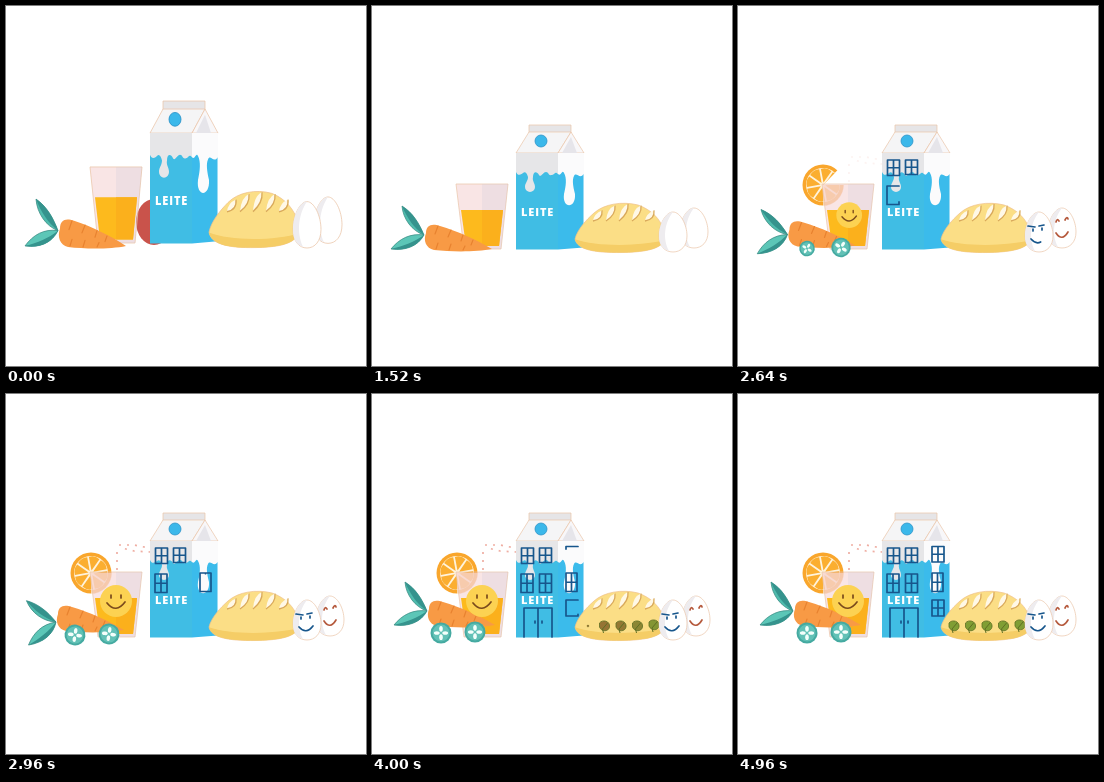
Recreate the animation shown at these times as an HTML page. Size 360 by 360 pixels, loop 5.04 s.

```html
<!DOCTYPE html>
<html lang="pt">
<head>
<meta charset="utf-8">
<style>
html, body { margin: 0; height: 100%; overflow: hidden; background: #fff; }
svg { display: block; width: 100vw; height: 100vh; }
.ink { fill: none; stroke: #17568c; stroke-width: 1.7; stroke-linecap: round; stroke-linejoin: round; }
.warm { stroke: #b5593c; }
.brown { stroke: #7a4a1c; }
.edge { stroke: #eac5a8; stroke-width: .7; }
text { font: 800 11px "Open Sans", sans-serif; letter-spacing: .9px; fill: #fff; }
</style>
</head>
<body>
<svg viewBox="0 0 360 360">
  <defs>
    <clipPath id="sweep"><path id="pie"/></clipPath>
    <clipPath id="loaf"><use href="#crust"/></clipPath>
  </defs>

  <ellipse id="fruit" cy="216" rx="18" ry="23" fill="#c9534b"/>

  <g id="straw" fill="none" stroke="#efaea3" stroke-width="1.7" stroke-dasharray="2 6">
    <path d="M111 176V156M113 151L128 151L143 154"/>
    <path d="M116 154L128 157L144 158" stroke-dashoffset="-3"/>
  </g>
  <g id="slice" clip-path="url(#sweep)">
    <circle cx="85" cy="179" r="20.5" fill="#f9a62c"/>
    <circle cx="85" cy="179" r="17" fill="#fff3dc"/>
    <g id="segments" fill="#fbae30"></g>
    <path d="M85 179h21a21 21 0 0 1 -21 21z" fill="#fdeee8" fill-opacity=".7"/>
  </g>

  <g id="glass">
    <path d="M84 178H136L129 243H92Z" fill="#e8a0a0" fill-opacity=".28" class="edge"/>
    <path d="M110 178H136L129 243H110Z" fill="#c4c2d4" fill-opacity=".2"/>
    <path d="M89 204H131L127 240H94Z" fill="#fdba1d"/>
    <path d="M110 204H131L127 240H110Z" fill="#fbb01c"/>
  </g>

  <g id="milk">
    <path d="M157 119H199V127H157Z" fill="#e6e5e7" class="edge"/>
    <path d="M157 126H199L186 147H144Z" fill="#f5f5f6" class="edge"/>
    <path d="M199 126L212 147H186Z" fill="#f8f7f9" class="edge"/>
    <path d="M199 131L205 147H190Z" fill="#e6e5ea"/>
    <path d="M144 147H186V243H144Z" fill="#e6e6e8"/>
    <path d="M186 147H212V241L186 243Z" fill="#fbfbfc"/>
    <path fill="#40bde4" d="M144 166C146 171 150 168 151 167C153 165 155 167 156 171C156 175 153 177 153 181A5 5 0 0 0 163 181C163 177 160 175 161 171C161 165 165 165 167 169C169 172 171 166 174 166C177 166 176 170 180 169C183 168 183 165 186 168V243.5H144Z"/>
    <path fill="#3bbbeb" d="M186 168C189 171 190 163 192 167C195 172 194 180 192 188C190 203 204 203 203 188C201 180 200 174 202 170C204 165 208 174 211.5 168V241.5L186 243.5Z"/>
    <circle cx="169" cy="135" r="6" fill="#3bb8ea" stroke="#2c93c8" stroke-width=".8"/>
    <text x="149" y="210">LEITE</text>
    <g id="windows"></g>
  </g>

  <g id="bread">
    <path id="crust" fill="#fbde86" stroke="#efc08a" stroke-width=".7" d="M203 233C205 224 214 214 222 207C232 198 250 195 266 199C280 204 288 213 292 224C297 239 285 246 250 246.5C220 247 205 243 203 233Z"/>
    <path clip-path="url(#loaf)" fill="#f5cd66" d="M200 232C220 241 270 241 297 233V250H200Z"/>
    <g id="cuts"></g>
    <g id="leaves"></g>
  </g>

  <g id="eggs">
    <g id="rear">
      <path class="edge" fill="#fff" d="M322 202C329 202 336 214 336 226C336 236 330 242 322 242C314 242 308 236 308 226C308 214 315 202 322 202Z"/>
      <path fill="#eeecef" d="M322 202C314 212 311 228 318 241C311 239 308 234 308 226C308 214 315 202 322 202Z"/>
      <path class="ink warm" data-at="2160" data-for="560" d="M316 216q1 -4 3 -1M325 214q2 -4 3 -1M316 227q6 9 12 -1"/>
    </g>
    <path class="edge" fill="#fff" d="M301 206C308 206 315 218 315 230C315 240 309 246 301 246C293 246 287 240 287 230C287 218 294 206 301 206Z"/>
    <path fill="#eeecef" d="M301 206C293 216 290 232 297 245C290 243 287 238 287 230C287 218 294 206 301 206Z"/>
    <path class="ink" data-at="2480" data-for="480" d="M290 220l7 1M301 220l5 -1M295 223v2M304 222v2M293 233q7 8 14 -1"/>
  </g>

  <g id="carrot">
    <g id="greens">
      <path fill="#4fbbad" stroke="#35877f" stroke-width=".7" d="M52 229C40 225 31 213 30 200C41 207 47 217 52 229Z"/>
      <path fill="#35938d" d="M52 229C42 222 35 212 30 200C41 207 47 217 52 229Z"/>
      <path fill="#5cc6b7" stroke="#35877f" stroke-width=".7" d="M52 229C46 240 34 245 19 243C27 233 38 227 52 229Z"/>
      <path fill="#35938d" d="M52 229C46 240 34 245 19 243C32 240 42 236 52 229Z"/>
    </g>
    <path fill="#f89a45" d="M54 227C54 219 60 217 68 220C85 225 105 234 120 243C105 246 80 246 62 244C54 242 51 235 54 227Z"/>
    <path fill="none" stroke="#e8822f" stroke-width="1.2" stroke-linecap="round" d="M66 220l-3 8M79 224l-3 7M91 229l-2 6M64 243l2 -6M77 244l2 -6M91 244l2 -4M101 234l-2 5"/>
  </g>
  <g id="wheels"></g>

  <g id="smiley">
    <circle cx="110" cy="208" r="16" fill="#fcd252"/>
    <path class="ink brown" d="M105 202v3M115 202v3M101 210q9 11 18 -1"/>
  </g>
</svg>

<script>
const LOOP = 5040, STEP = 80;
const $ = id => document.getElementById(id);
const set = (el, name, value) => el.setAttribute(name, value);
const move = (id, value) => set($(id), 'transform', value);
const clamp = x => Math.max(0, Math.min(1, x));
const ease = x => x * x * (3 - 2 * x);
const ramp = (t, at, span) => ease(clamp((t - at) / span));
const repeat = (n, make) => Array.from({ length: n }, (_, i) => make(i)).join('');

// Interpolates through time/value pairs
function track(t, ...keys) {
  let value = keys[0][1];
  for (let i = 1; i < keys.length; i++) {
    const [t0, a] = keys[i - 1], [t1, b] = keys[i];
    if (t >= t0) value = a + (b - a) * ramp(t, t0, t1 - t0);
  }
  return value;
}

// One continuous line from the top right corner: frame first, then the crossbars
const pane = (x, y, w, h) =>
  `M${x + w} ${y}h${-w}v${h}h${w}v${-h}h${-w / 2}v${h}v${-h / 2}h${-w / 2}h${w}`;
const sketch = (d, at, span = 400) =>
  `<path class="ink" data-at="${at}" data-for="${span}" d="${d}"/>`;

$('windows').innerHTML = [
  [pane(149.5, 154, 12, 15.5), 1840],
  [pane(167.5, 154, 12, 14.5), 2120],
  [pane(149, 180, 12, 18.5), 2480],
  [pane(194, 179, 11, 18.5), 2720],
  [pane(167.5, 180, 12, 18.5), 3040],
  ['M152 243V214H180V243V214H166V243', 3280, 640],
  ['M163 227v2M170 227v2', 3840, 160],
  [pane(194, 206, 12, 16), 3840],
  [pane(194, 152.5, 12, 15.5), 3920, 560]
].map(args => sketch(...args)).join('');

$('segments').innerHTML = repeat(8, i =>
  `<path d="M85 176.5l-5.4 -12.8q5.4 -3 10.800 0z" transform="rotate(${i * 45 + 12} 85 179)"/>`);

$('cuts').innerHTML = repeat(5, i => {
  const x = 221 + i * 13, top = 198 + (i - 2) ** 2 * 1.6;
  return `<path fill="#fff8e6" d="M${x} 215Q${x + 1} ${top + 3} ${x + 9} ${top}Q${x + 10} ${top + 9} ${x} 215Z"/>
    <path fill="none" stroke="#d9a95a" stroke-width="1.3" d="M${x} 215Q${x + 10} ${top + 9} ${x + 9} ${top}"/>`;
});

$('leaves').innerHTML = repeat(5, () =>
  `<g><path stroke="#5f6f24" stroke-width=".8" d="M-5 -3C-2 -7 6 -5 5 1C4 6 -3 6 -5 1Z"/>
  <path fill="none" stroke="#5f6f24" d="M3 -3L-2 3L-1 7"/></g>`);

$('wheels').innerHTML = repeat(2, () =>
  `<g><circle r="10.5" fill="#45aaa1"/><circle r="8.500" fill="#62c1b6"/>
  ${repeat(4, i => `<ellipse cy="-4.2" rx="1.8" ry="2.900" fill="#f4fffb" transform="rotate(${i * 90})"/>`)}</g>`);

const lines = document.querySelectorAll('[data-at]');
lines.forEach(line => set(line, 'pathLength', 1));

const stretch = (base, lift, amount, k) =>
  `translate(0 ${base - lift * k}) scale(1 ${1 + amount * k}) translate(0 ${-base})`;

function render(t) {
  const k = Math.exp(-t / 120) * Math.cos(t / 100);
  move('milk', stretch(243, 6, .145, k));
  move('glass', stretch(243, 6, .17, k));
  move('bread', stretch(246, 5, .14, k));
  move('eggs', stretch(246, 4, .16, k));
  set($('fruit'), 'cx', 148 + 22 * (1 - k));
  set($('fruit'), 'visibility', t < 400 ? 'visible' : 'hidden');

  for (const line of lines) {
    const p = clamp((t - line.dataset.at) / line.dataset.for);
    line.style.visibility = p ? 'visible' : 'hidden';
    line.style.strokeDasharray = p < 1 ? `${p} 2` : 'none';
  }

  move('rear', `translate(${track(t, [1840, 0], [2320, 2])} 0)`);

  const x = track(t, [1840, 0], [2320, -3], [2960, -2], [3520, 2], [4000, 3]);
  const y = track(t, [2320, 0], [2960, -7], [3520, -11], [4000, -12]);
  const drop = track(t, [2320, 0], [2960, 6], [3520, 0]);
  const bend = track(t, [1840, 0], [2320, -2], [2960, -17], [3520, -8], [4000, 0]);
  move('carrot', `translate(${x} ${y}) ${stretch(244, 3, .09, k)}`);
  move('greens', `translate(0 ${drop}) rotate(${bend} 52 229)`);

  [...$('wheels').children].forEach((wheel, i) => {
    const size = ramp(t, 2240 + (1 - i) * 80, 480);
    const wheelY = track(t, [2320, 244], [2960, 241], [3520, 239]) - i;
    set(wheel, 'transform', `translate(${69 + i * 34} ${wheelY}) rotate(${track(t, [2320, -180], [3520, 0])}) scale(${size})`);
  });

  const turn = ramp(t, 2080, 720) * 359.9 * Math.PI / 180;
  set($('pie'), 'd', `M85 179h22A22 22 0 ${+(turn > Math.PI)} 1 ${85 + 22 * Math.cos(turn)} ${179 + 22 * Math.sin(turn)}Z`);
  set($('slice'), 'visibility', turn ? 'visible' : 'hidden');
  set($('segments'), 'opacity', ramp(t, 2320, 320));

  const grow = ramp(t, 2240, 560);
  move('smiley', `translate(${116 - 6 * grow} ${218 - 11 * grow}) scale(${grow}) translate(-110 -208)`);
  set($('straw'), 'opacity', ramp(t, 2560, 320));

  [...$('leaves').children].forEach((leaf, i) => {
    const at = 3360 + i * 145;
    const ripe = ramp(t, at + 240, 560);
    set(leaf, 'transform', `translate(${282 - i * 16.5} ${231 + Math.min(i, 1)}) scale(${ramp(t, at, 200)})`);
    set(leaf, 'fill', `rgb(${150 - 22 * ripe} ${116 + 42 * ripe} 52)`);
  });
}

function tick() {
  render(Math.floor(performance.now() % LOOP / STEP) * STEP);
  requestAnimationFrame(tick);
}
tick();
</script>
</body>
</html>
```
